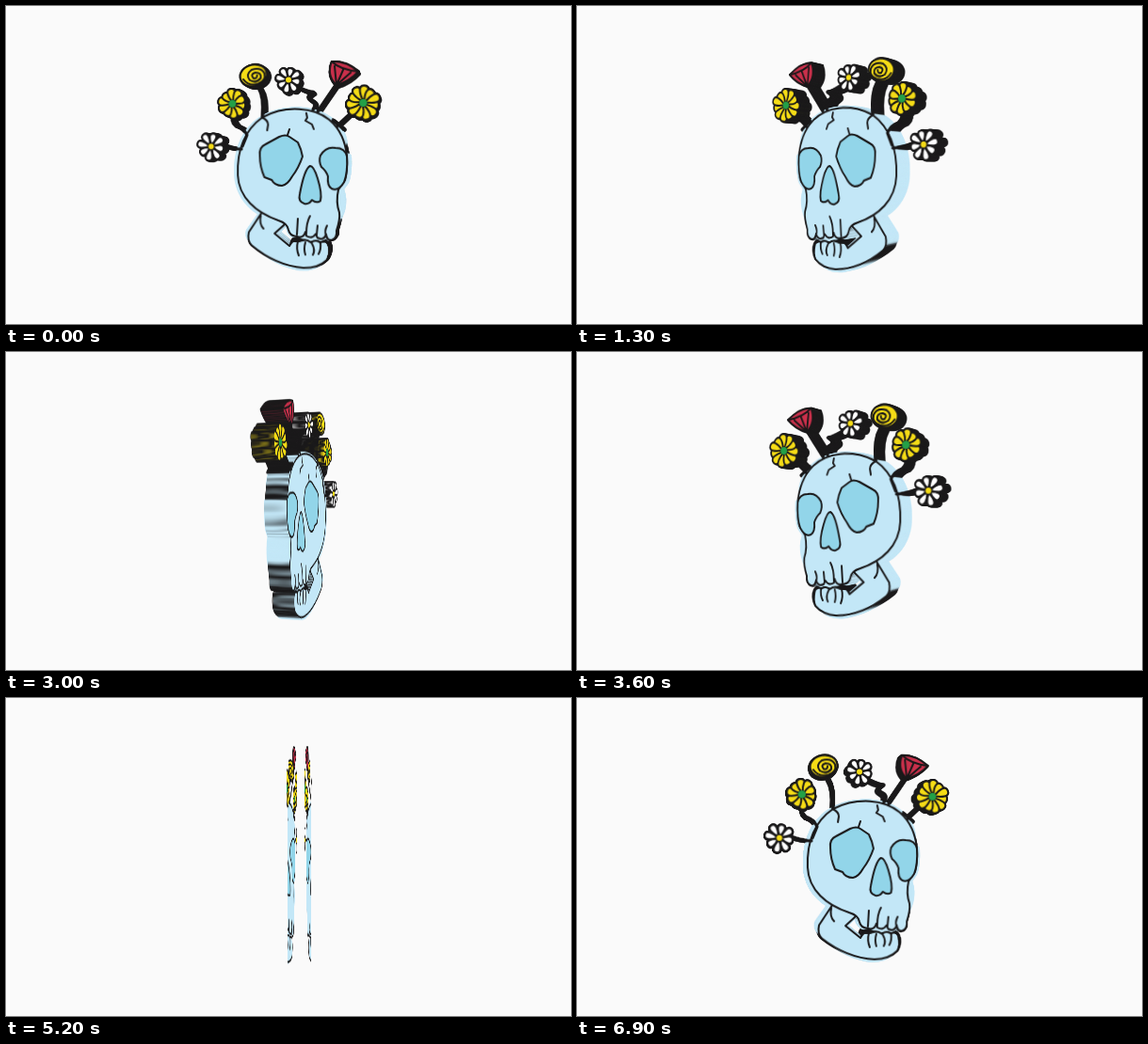
Animation, 600 px wide and 338 px high, one loop 7 s. Source, as an HTML page:

```html
<!DOCTYPE html>
<html lang="en">
<head>
<meta charset="utf-8">
<title>Spinning flower skull</title>
<style>
  html, body { margin: 0; width: 100%; height: 100%; overflow: hidden; background: #fafafa; }
  #stage { position: relative; width: 600px; height: 338px; overflow: hidden; perspective: 750px; }
  #spin { position: absolute; inset: 0; transform-style: preserve-3d; }
  svg { position: absolute; left: 0; top: 0; }
  .line { fill: none; stroke: #191819; stroke-width: 2; stroke-linecap: round; stroke-linejoin: round; }
  .stem { stroke-width: 3.2; }
  .skin { fill: #c3e7f7; }
  .hollow { fill: #92d5e9; }
  .gold { fill: #f5dc16; }
  .rose { fill: #c9304b; }
</style>
</head>
<body>
<div id="stage"><div id="spin">
  <svg width="600" height="338" viewBox="0 0 600 338">
    <path class="skin" d="M300 108C325 106 342 115 348 122Q361 133 361 150V155L365 159Q366 179 362 188L357 195Q361 206 358 218Q354 228 351 238Q351 246 346 248Q341 250 340 246Q336 251 331 248Q325 251 319 247Q314 250 309 247Q300 246 298 239Q298 230 288 230C262 224 241 206 241 176C241 134 265 111 300 108Z"/>
    <path class="skin" d="M267 221L254 239Q252 246 257 251L262 256Q285 277 312 281Q330 281 339 271Q343 263 340 253L333 250L324 250L318 246L311 249Q306 246 303 252L301 253L288 242L299 231Q284 224 267 221Z"/>

    <g class="line stem">
      <path d="M228 148Q238 152 249 152"/>
      <path d="M241 115Q236 121 243 127Q252 130 255 137L250 149"/>
      <path d="M267 85Q274 96 272 117"/>
      <path d="M306 84Q317 91 326 92Q317 97 325 101Q331 104 326 111"/>
      <path d="M351 84L331 113M365 116L352 128M347 122L358 131"/>
    </g>

    <path class="line" d="M272 118C298 105 327 108 343 121C356 132 360 145 362 159Q363 174 360 185L353 195Q350 208 354 219Q355 226 351 238Q352 246 346 248Q341 249 340 242Q338 249 331 246L329 242Q325 248 319 244L318 240Q316 247 309 245Q301 244 300 238Q299 231 289 228C265 220 246 204 245 180C244 153 253 131 272 118"/>
    <path class="line" d="M309 243L310 226M319 242Q319 230 323 223M330 243L331 233M340 243Q338 239 341 233"/>
    <path class="line" d="M271 220L257 241Q255 250 260 255C280 271 300 277 316 278Q332 278 341 269Q346 260 342 252Q339 247 334 251Q329 247 324 251Q318 246 311 250Q305 247 301 255L285 242L296 232M270 223Q268 232 273 237"/>
    <path class="line" d="M310 250Q308 258 311 265M318 251Q316 258 318 264M325 252Q329 259 326 264M334 251Q335 258 332 263"/>
    <path d="M302 251Q304 244 312 246L319 249L311 251Z" fill="#191819"/>

    <path class="line hollow" d="M275 147L290 139Q297 136 301 139L310 145Q314 153 315 160Q311 172 304 181Q299 190 293 191Q285 191 282 185L274 182Q269 171 269 159Q268 150 275 147Z"/>
    <path class="line hollow" d="M334 159Q340 149 350 151Q360 151 362 160Q363 177 359 187Q353 197 346 194Q341 191 342 181Q340 175 335 171Q332 165 334 159Z"/>
    <path class="line hollow" d="M323 170Q327 170 331 183Q336 199 334 207Q330 210 325 206Q322 211 317 210Q310 208 312 200Q317 173 323 170Z"/>
    <path class="line" d="M271 118Q278 121 278 126L277 132M319 114L320 119L318 122L325 126L327 131M301 131L299 137"/>

    <ellipse class="line gold" cx="262" cy="73" rx="14.5" ry="11.5" transform="rotate(-10 262 73)"/>
    <path class="line" d="M251 77Q257 85 267 82Q276 79 274 71Q270 64 260 67Q253 72 258 78Q265 82 270 76Q271 70 264 70Q258 72 262 76Q266 77 266 73"/>
    <path class="line rose" d="M346 60Q360 59 374 71Q365 81 351 85Q340 75 346 60Z"/>
    <path class="line" d="M346 60Q355 69 374 71M351 85L349 65M351 85L358 69M351 85L366 72"/>
  </svg>
</div></div>
<script>
  const spin = document.getElementById('spin');
  const face = spin.querySelector('svg');
  const LOOP = 7000, STEP = 100, TURNS = 3, START = 8.7, DEPTH = 23;
  const WHITE = '#fff', GOLD = '#f5dc16', GREEN = '#23a047';

  function daisy(x, y, radius, petals, width, color, heart, heartSize) {
    let art = '';
    for (let i = 0; i < petals; i++) {
      const tip = radius * (i % 3 ? 1 : 0.9), mid = tip / 2;
      art += `<path class="line" style="fill:${color}" transform="rotate(${i * 360 / petals + 12})"
        d="M2 0C${mid} ${-width} ${tip} ${-1.6 * width} ${tip} 0S${mid} ${width} 2 0Z"/>`;
    }
    face.insertAdjacentHTML('beforeend',
      `<g transform="translate(${x} ${y})">${art}<circle r="${heartSize}" fill="${heart}"/></g>`);
  }

  daisy(215.5, 149, 15.5, 8, 3.6, WHITE, GOLD, 3);
  daisy(300, 78.5, 14, 8, 3.4, WHITE, GOLD, 3);
  daisy(239, 103, 16, 10, 4.2, GOLD, GREEN, 4);
  daisy(379, 104, 18, 11, 4.4, GOLD, GREEN, 4);

  // Stacked copies of the drawing give it thickness.
  for (let d = 1; d <= DEPTH; d++) {
    const layer = face.cloneNode(true);
    layer.style.transform = `translateZ(${-d}px)`;
    spin.append(layer);
  }

  function draw(now) {
    const t = Math.floor(now % LOOP / STEP) * STEP;
    spin.style.transform = `rotateY(${-START - 360 * TURNS * t / LOOP}deg)`;
    requestAnimationFrame(draw);
  }
  draw(performance.now());
</script>
</body>
</html>
```
